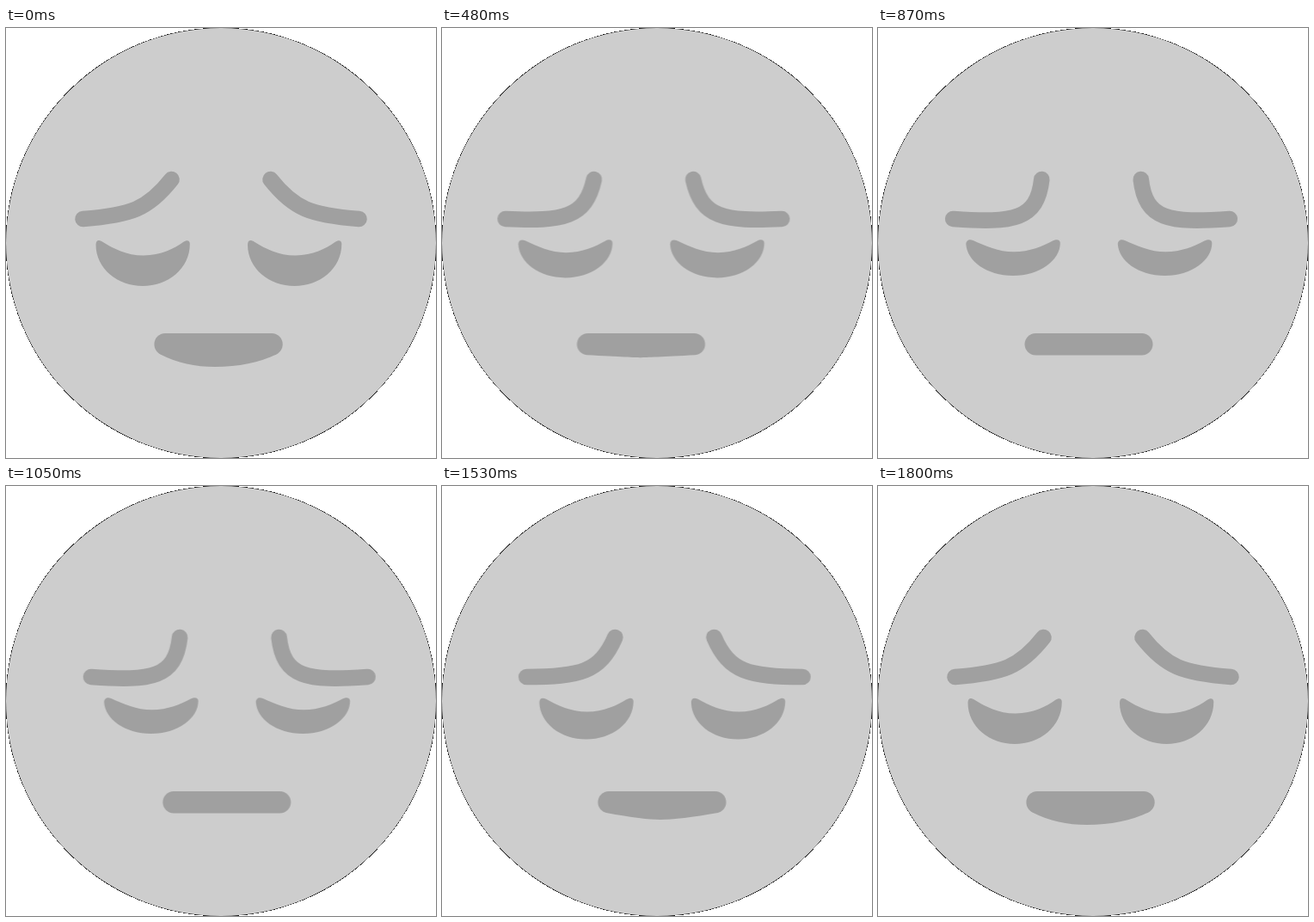
Animation of 500x500 px, one loop 2130 ms. Source, as an HTML page without scripts:

```html
<!DOCTYPE html>
<html lang="en">
<head>
<meta charset="utf-8">
<title>Pensive face</title>
<style>
html, body { margin: 0; width: 100%; height: 100%; overflow: hidden; background: #fff; }
svg { display: block; width: 100%; height: 100%; }
.rim { shape-rendering: crispEdges; }
.skin { fill: #cdcdcd; }
.features { fill: #a0a0a0; animation: sway 2130ms infinite steps(20); }
.brow { fill: none; stroke: #a0a0a0; stroke-width: 18.6; stroke-linecap: round; animation: brow 2130ms infinite steps(20); }
.eye { animation: eye 2130ms infinite steps(20); }
.mouth { animation: mouth 2130ms infinite steps(20); }

/* 600 ms left, 600 ms across, 600 ms back, then a rest */
@keyframes sway {
  0%, 84.507%, 100% { transform: translateX(0); }
  28.169% { transform: translateX(-19.5px); }
  56.338% { transform: translateX(19.5px); }
}
@keyframes brow {
  0%, 84.507%, 100% { d: path("M89.5 222C145 217.5 165 211 192.5 176"); }
  28.169%, 56.338% { d: path("M89.2 222C160 227 187 223 192.3 176"); }
}
@keyframes eye {
  0%, 84.507%, 100% { d: path("M104.5 252C104.5 247 107.5 245.5 112 248.5C125 256.5 140 264.5 160 264.5C180 264.5 196 256 206 249C210.5 246 213.8 247 213.8 251C213.8 280 188 300 159 300C130 300 104.5 280 104.5 252Z"); }
  28.169%, 56.338% { d: path("M104.3 251.5C104.3 247 108 245 112.5 247C127 253.5 142 260.3 160 260.3C178 260.3 194 253.5 205 247.5C210 245 213.8 246 213.8 250C213.8 270 190 288 159 288C128 288 105.5 270.5 104.3 251.5Z"); }
}
@keyframes mouth {
  0%, 84.507%, 100% { d: path("M185 355L309 355C316 355 321.7 360.6 321.7 367.7C321.7 372.5 319 377 314.5 379.5C295 389 270 394 243 394C220 394 199 389.5 179.5 379.5C175 377 172.4 372.5 172.4 367.7C172.4 360.6 178 355 185 355Z"); }
  28.169%, 56.338% { d: path("M185.2 355L308.8 355C315.8 355 321.5 360.7 321.5 367.8C321.5 374.8 315.8 380.5 308.8 380.5C268 380.5 247 380.5 247 380.5C247 380.5 228 380.5 185.2 380.5C178.2 380.5 172.5 374.8 172.5 367.8C172.5 360.7 178.2 355 185.2 355Z"); }
}
</style>
</head>
<body>
<svg viewBox="0 0 500 500">
  <circle class="rim" cx="250" cy="250" r="250.5"/>
  <circle class="skin" cx="250" cy="250" r="250"/>
  <g class="features">
    <path class="brow"/>
    <g transform="translate(500 0) scale(-1 1)"><path class="brow"/></g>
    <path class="eye"/>
    <g transform="translate(176.5 0)"><path class="eye"/></g>
    <path class="mouth"/>
  </g>
</svg>
</body>
</html>
```
